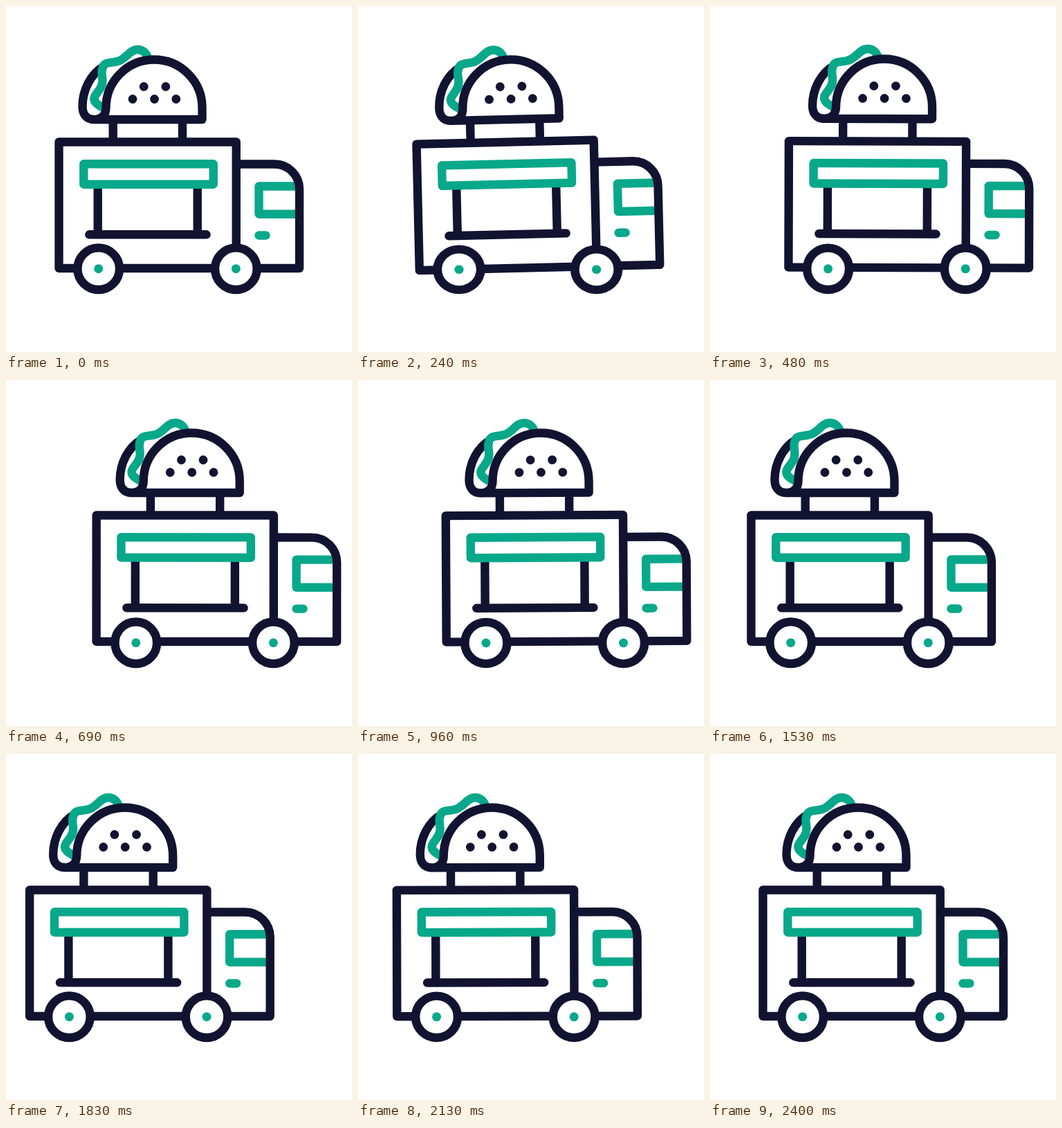
Animation, 500 px wide and 500 px high, one loop 4.43 s. Source, as an HTML page:

```html
<!DOCTYPE html>
<html lang="en">
<head>
<meta charset="utf-8">
<title>Taco truck</title>
<style>
  html, body { margin: 0; width: 100%; height: 100%; overflow: hidden; background: #fff; }
  svg { display: block; width: 100%; height: 100%; }
  .line { fill: none; stroke: #121331; stroke-width: 12.4; stroke-linejoin: round; }
  .round { stroke-linecap: round; }
  .green { stroke: #08a88a; }
  .white { fill: #fff; }
  .dots { fill: #121331; }
  .hub { fill: #08a88a; }
</style>
</head>
<body>
<svg viewBox="0 0 500 500">
  <g id="truck">
    <g id="body">
      <path class="line green" d="M420 260.5H365.5V300.7H420"/>
      <path class="line green round" d="M365.5 331.5H375.5"/>
      <path class="line" d="M332 228.5H388A36 36 0 0 1 424 264.5V379H332"/>
      <path class="line" d="M76.5 196.5H332.7V379H76.5Z"/>
      <path class="line" d="M132.7 258V330M276.7 258V330"/>
      <path class="line round" d="M120.3 330.3H289.5"/>
      <path class="line green" d="M112.3 228.3H299.7V257.7H112.3Z"/>

      <path class="line" d="M154.7 164V196M255 164V196"/>
      <path class="line" d="M142 87C122 98 110.5 122 110.5 145C110.5 156 116 164 127 164"/>
      <path class="line green" d="M145 149C135 145 125 139 128 131C132 123 139.5 119 139.5 108C139.5 102 137 96 139.5 90C141.5 80 150 83 161 80C174 77 178 63 190 63C198 63 203 68 205 75"/>
      <path class="white" d="M144.5 164V147A69.5 69.5 0 0 1 283.5 147V164Z"/>
      <path class="line" d="M127 164H283.5V147A69.5 69.5 0 0 0 144.5 147C144.5 158 137 164 127 164Z"/>
      <g class="dots">
        <circle cx="199.2" cy="116.5" r="6.4"/>
        <circle cx="230.8" cy="116.5" r="6.4"/>
        <circle cx="183" cy="134.5" r="6.4"/>
        <circle cx="214.5" cy="134.5" r="6.4"/>
        <circle cx="245.8" cy="134.5" r="6.4"/>
      </g>
    </g>
    <g class="wheel">
      <circle class="line white" cx="133.7" cy="379.7" r="30.3"/>
      <circle class="hub" cx="133.7" cy="379.7" r="6.5"/>
    </g>
    <g class="wheel">
      <circle class="line white" cx="332.3" cy="379.7" r="30.3"/>
      <circle class="hub" cx="332.3" cy="379.7" r="6.5"/>
    </g>
  </g>
</svg>
<script>
  const LOOP = 4430, MOVE = 2400, STEP = 30, GROUND = 416;
  const truck = document.getElementById('truck');
  const body = document.getElementById('body');
  const wheels = [...document.querySelectorAll('.wheel')];
  const hubs = [133.7, 332.3];

  // Keys are [time, value, power]; a power below 1 starts the segment faster.
  const drive = [[0, 0], [800, 57], [1900, -43.5], [MOVE, 0, .83]];
  const lean = [[0, 0], [230, -1.35], [500, .18], [760, 0], [950, -.3],
                [1200, 1.35], [1530, 0], [1850, 0], [2010, -.9], [2150, -.1], [MOVE, 0]];
  const lift = [[0, 0], [230, 0], [480, -1], [960, -1], [1200, 0], [1530, -1], [1650, 0], [MOVE, 0]];

  function valueAt(keys, t) {
    const i = Math.max(1, keys.findIndex(k => k[0] >= t));
    const [t0, a] = keys[i - 1], [t1, b, power = 1] = keys[i];
    const u = ((t - t0) / (t1 - t0)) ** power;
    return a + (b - a) * u * u * (3 - 2 * u);
  }

  function draw(time) {
    const t = Math.min(MOVE, Math.floor(time % LOOP / STEP) * STEP);
    const angle = valueAt(lean, t);
    const squash = Math.abs(angle) * .023;
    truck.setAttribute('transform', `translate(${valueAt(drive, t)} 0)`);
    body.setAttribute('transform', `translate(0 ${valueAt(lift, t)}) rotate(${angle} 206 380)`);
    wheels.forEach((wheel, i) => wheel.setAttribute('transform',
      `translate(${hubs[i]} ${GROUND}) scale(${1 + squash} ${1 - squash}) translate(${-hubs[i]} ${-GROUND})`));
  }

  const start = performance.now();
  function tick() {
    draw(performance.now() - start);
    requestAnimationFrame(tick);
  }
  tick();
</script>
</body>
</html>
```
